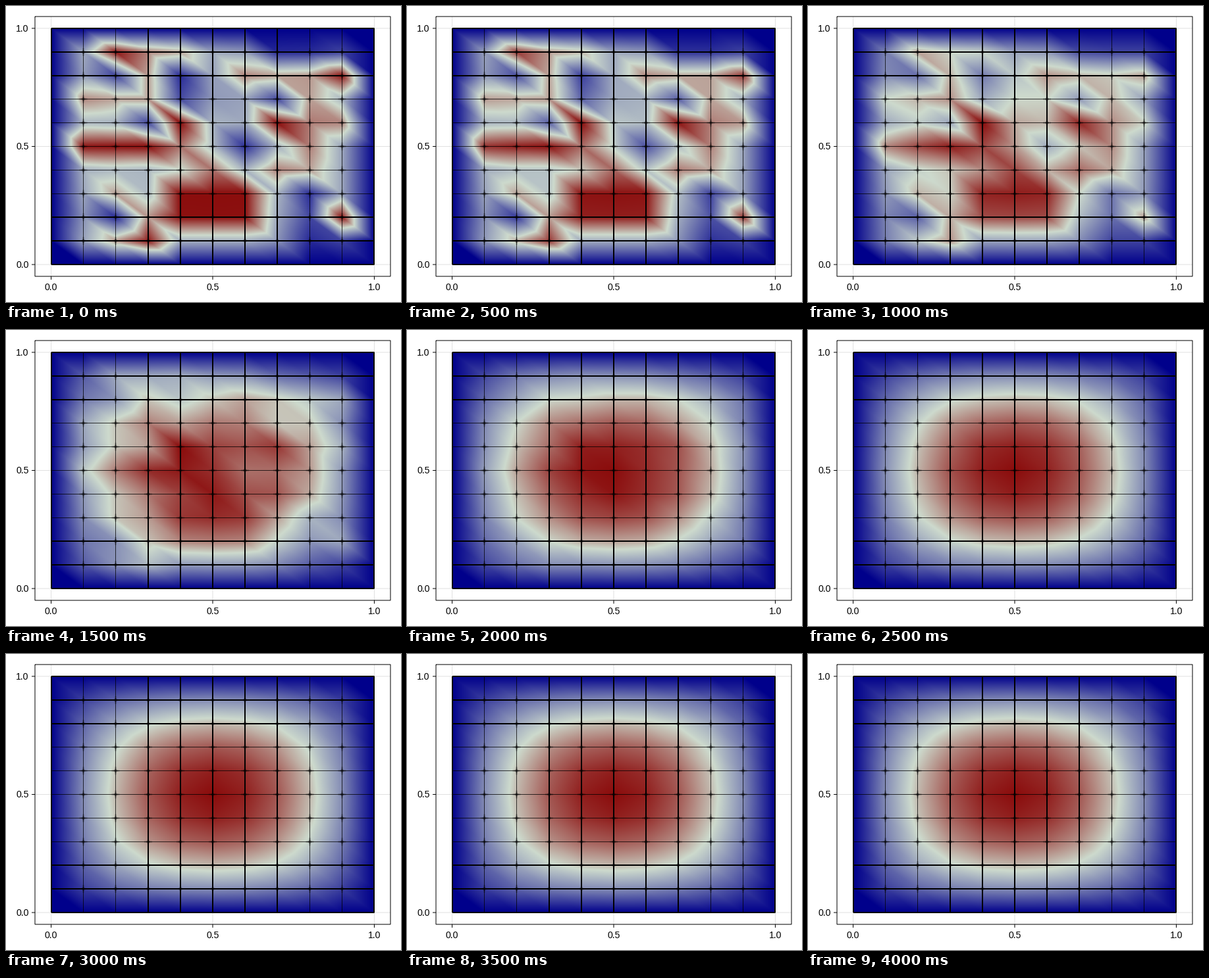
Recreate the animation shown at these times as a matplotlib script. Size 600 by 450 pixels, loop 4500 ms.

```python
import numpy as np
import matplotlib.pyplot as plt
from matplotlib.animation import FuncAnimation
from matplotlib.colors import LinearSegmentedColormap

W, H, DPI = 600, 450, 100
PX = 72 / DPI
N, FRAMES, STEP = 10, 9, 500

# Plot frame in pixels; the unit square has a margin of 5 % around it
X0, X1, Y0, Y1 = 44, 584, 16, 411


def px(x):
    return X0 + (X1 - X0) * (x + 0.05) / 1.1


def py(y):
    return Y1 - (Y1 - Y0) * (y + 0.05) / 1.1


HEAT = LinearSegmentedColormap.from_list(
    "heat", [(0, "#00008b"), (0.61, "#cddacd"), (1, "#8b0c0c")], N=1024)

# Streaks in mesh units: start x, y and optional reach dx, dy
WARM = [(3, 9, 1), (1, 7, 2), (3, 7, 0, 1), (6, 8, 3), (8, 4, 0, 3),
        (7, 4, 1), (4, 5, 1, -1), (9, 6), (2, 3), (3, 2), (2, 1)]
COLD = [(2, 8), (4, 7, 0, 1), (3, 6), (7, 7), (6, 5), (2, 2),
        (8, 2, 0, 1), (8, 1, 1), (7, 9, 2)]
HOT = [(2, 9), (9, 8), (4, 6), (7, 6), (1, 5, 2), (4, 3, 2), (4, 2, 2),
       (9, 2), (3, 1)]

GY, GX = np.mgrid[1:N, 1:N]


def streak(x, y, dx=0, dy=0):
    """Soft mask around a line segment."""
    s = ((GX - x) * dx + (GY - y) * dy) / max(dx * dx + dy * dy, 1)
    s = np.clip(s, 0, 1)
    d2 = (GX - x - s * dx) ** 2 + (GY - y - s * dy) ** 2
    return np.exp(-d2 / 0.42)


def start_field():
    u = np.full((N - 1, N - 1), 0.42)
    for streaks, level in ((WARM, 0.75), (COLD, 0.1), (HOT, 0.96)):
        mask = np.max([streak(*s) for s in streaks], axis=0)
        u += (level - u) * mask
    return u / u.max()


def steady_field():
    """Evenly heated plate with cold edges, solved with sine modes."""
    k = np.arange(1, N)
    modes = np.sqrt(2 / N) * np.sin(np.pi * np.outer(k, k) / N)
    c = np.cos(np.pi * k / N)
    load = modes @ np.ones((N - 1, N - 1)) @ modes
    u = modes @ (load / (2 - c[:, None] - c)) @ modes
    return u / u.max()


START, STEADY = start_field(), steady_field()


def nodes(n):
    """Node values in frame n: the start gives way to the steady state."""
    w = 1 / (1 + 30 * 4.64 ** -n)
    u = (1 - w) * START + w * STEADY
    return np.pad(u / u.max(), 1)


# Mesh cell and place within it for every pixel
LEFT, RIGHT, TOP, BOTTOM = 69, 559, 34, 393
SX = (np.arange(LEFT, RIGHT) + 0.5 - px(0)) / (px(1) - px(0)) * N
SY = (py(0) - np.arange(TOP, BOTTOM) - 0.5) / (py(0) - py(1)) * N
SX, SY = np.meshgrid(SX, SY)
IX, IY = SX.astype(int), SY.astype(int)
FX, FY = SX - IX, SY - IY


def field(n):
    """Linear interpolation on two triangles per cell."""
    u = nodes(n)
    a, b = u[IY, IX], u[IY, IX + 1]
    d, e = u[IY + 1, IX], u[IY + 1, IX + 1]
    low = a + FX * (b - a) + FY * (d - a)
    high = e + (1 - FX) * (d - e) + (1 - FY) * (b - e)
    return np.where(FX + FY <= 1, low, high)


fig = plt.figure(figsize=(W / DPI, H / DPI), dpi=DPI, facecolor="white")
ax = fig.add_axes([0, 0, 1, 1])
ax.axis("off")


def line(xs, ys, width=1, alpha=1.0, z=3):
    ax.plot(xs, ys, color="black", lw=width * PX, alpha=alpha, zorder=z,
            snap=False, solid_capstyle="butt", solid_joinstyle="miter")


# Axis frame, grid, ticks and labels
FONT = dict(family="Liberation Sans", size=14 * PX, color="black")
for v in (0, 0.5, 1):
    x, y = px(v), py(v)
    line([x, x], [Y0, Y1], alpha=0.12, z=1)
    line([X0, X1], [y, y], alpha=0.12, z=1)
    line([x, x], [Y1, Y1 + 5])
    line([X0 - 5, X0], [y, y])
    ax.text(x, 432.5, f"{v:.1f}", ha="center", va="baseline", **FONT)
    ax.text(34.5, y + 5, f"{v:.1f}", ha="right", va="baseline", **FONT)
line([X0, X1, X1, X0, X0], [Y0, Y0, Y1, Y1, Y0])


def wire(pos, wide):
    """Crisp position, width and opacity of a mesh wire."""
    return (round(pos), 2, 1) if wide else (int(pos) + 0.5, 1, 0.75)


COLS = [wire(px(i / N), i in (0, 3, 4, 5, 6, 7, N)) for i in range(N + 1)]
ROWS = [wire(py(j / N), j in (0, 1, 2, 8, 9, N)) for j in range(N + 1)]
for x, width, alpha in COLS:
    line([x, x], [TOP, BOTTOM], width, alpha)
for y, width, alpha in ROWS:
    line([LEFT, RIGHT + 0.5], [y, y], width, alpha)

# Smudges where wires meet
for x, *_ in COLS[1:-1]:
    for y, *_ in ROWS[1:-1]:
        for reach, width, alpha in ((6, 2, 0.3), (3, 3, 0.25)):
            line([x - reach, x + reach], [y, y], width, alpha)
            line([x, x], [y - reach, y + reach], width, alpha)

image = ax.imshow(field(0), cmap=HEAT, vmin=0, vmax=1, aspect="auto",
                  extent=(LEFT, RIGHT, BOTTOM, TOP),
                  interpolation="nearest", zorder=2)
ax.set_xlim(0, W)
ax.set_ylim(H, 0)


def update(n):
    image.set_data(field(n))
    return [image]


anim = FuncAnimation(fig, update, frames=FRAMES, interval=STEP,
                     repeat=True, repeat_delay=0, blit=False)
plt.show()
```
